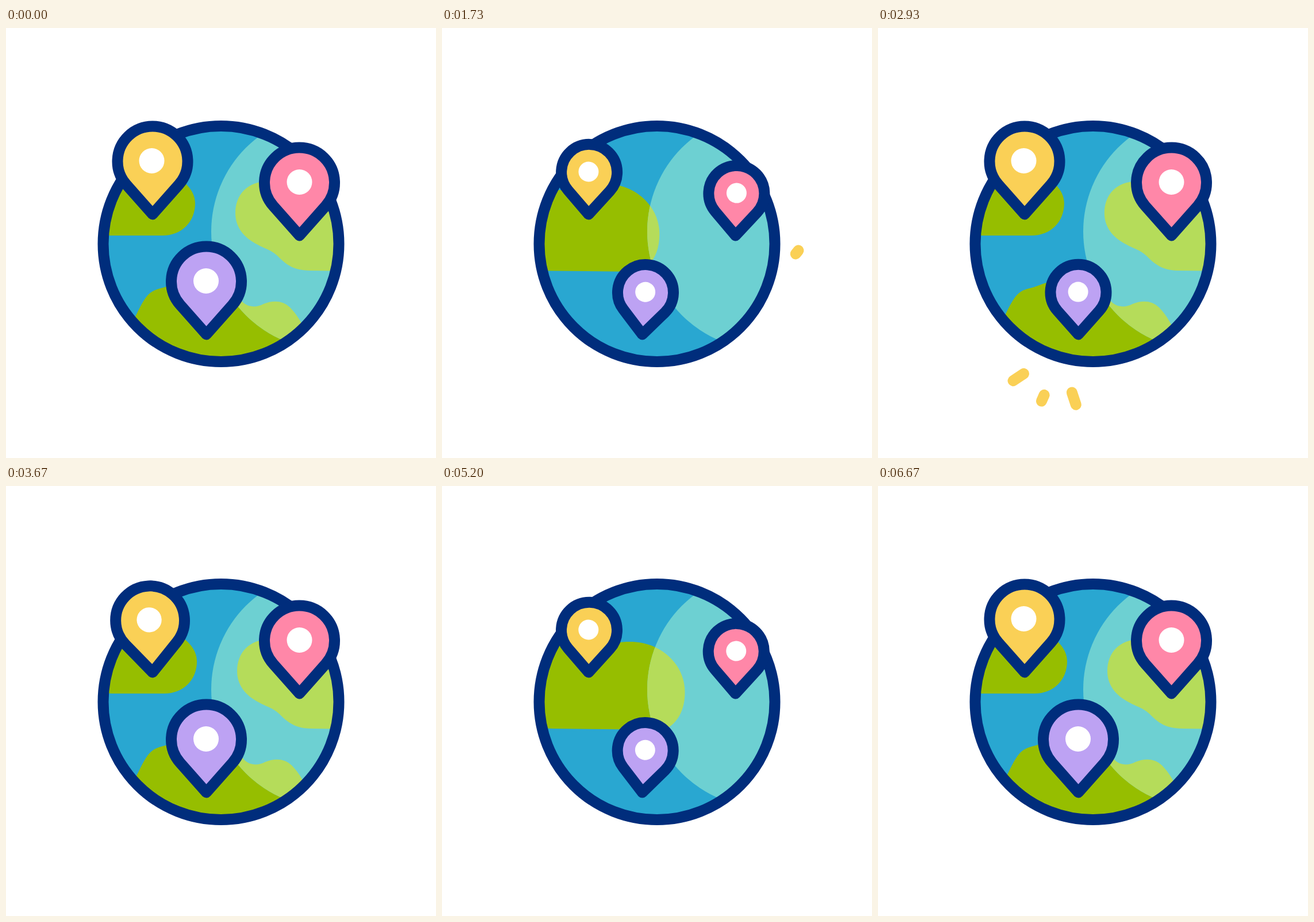
An HTML page for the animation above (6740 ms loop, 748 by 748 pixels).

```html
<!DOCTYPE html>
<html lang="en">
<head>
<meta charset="utf-8">
<title>Globe with pins</title>
<style>
  html, body { margin: 0; width: 100%; height: 100%; overflow: hidden; background: #fff; }
  svg { display: block; width: 100%; height: 100%; }
  .line { fill: none; stroke: #fad056; stroke-width: 19; stroke-linecap: round; }
  .pin path { stroke: #002d7c; stroke-linejoin: round; }
</style>
</head>
<body>
<svg viewBox="0 0 748 748">
  <defs>
    <clipPath id="globe"><circle cx="374" cy="375.5" r="200"/></clipPath>
    <clipPath id="shine"><circle cx="563" cy="354" r="206"/></clipPath>
    <g id="lands">
      <path d="M182 361H272C306 361 329 337 329 305C329 280 306 259 262 240C235 225 215 220 187 220C125 220 77 245 77 283C77 325 125 361 182 361Z"/>
      <path d="M399 322C399 290 420 267 455 267C500 268 540 282 590 282C615 282 625 271 665 271C718 271 760 310 760 358C760 390 748 412 725 424L530 422C505 422 492 415 478 402C462 385 452 385 438 377C412 364 399 345 399 322Z"/>
      <path d="M210 600C207 560 212 525 228 496C242 468 248 458 268 453C290 448 300 438 332 438C375 438 400 460 410 475C420 486 435 487 448 480C465 473 482 474 494 486C515 508 532 540 530 600Z"/>
    </g>
    <g id="map"><use href="#lands"/><use href="#lands" x="-854"/></g>
  </defs>

  <g id="sparks"></g>
  <g clip-path="url(#globe)">
    <rect width="748" height="748" fill="#29a7d1"/>
    <use class="map" href="#map" fill="#96be00"/>
    <g clip-path="url(#shine)">
      <rect width="748" height="748" fill="#6dd0d2"/>
      <use class="map" href="#map" fill="#b5dc5a"/>
    </g>
  </g>
  <circle cx="374" cy="375.5" r="205" fill="none" stroke="#002d7c" stroke-width="19"/>
  <g id="pins"></g>
  <path id="trail" class="line" pathLength="1" d="M130 387C178 450 280 479 375 479S572 450 620 387"/>
</svg>
<script>
const LOOP = 6740, CYCLE = LOOP / 2, STEP = LOOP / 101;
const MAP_WIDTH = 854, STROKE = 19;

// x, y: tip; dot: hole offset; start: shrink; burst: sparks; grow: return to full size
const pins = [
  { x: 255, y: 324, color: '#fad056', dot: -1.5, start: 200, burst: 2130, grow: 2400, place: '' },
  { x: 510.5, y: 361, color: '#ff87a8', dot: 0, start: 320, burst: 2420, grow: 2700, place: 'rotate(93 374 375.5)' },
  { x: 348.5, y: 533, color: '#bda2f3', dot: -.5, start: 800, burst: 2700, grow: 2980, place: 'rotate(242 374 375.5) translate(7 7)' }
];
const sway = [[0, 0], [100, -2.8], [220, -4], [330, -3], [600, 4.5], [720, 5], [930, 4.3], [1600, .8], [2000, 0]];
const shrink = [[0, 1], [100, .982], [330, .845], [420, .795]];

const progress = (t, from, to) => Math.min(1, Math.max(0, (t - from) / (to - from)));
const smooth = u => u * u * (3 - 2 * u);
const easeOut = (u, power = 2) => 1 - (1 - u) ** power;

function follow(keys, t) {
  const i = keys.findIndex(key => key[0] > t);
  if (i === 0) return keys[0][1];
  if (i < 0) return keys[keys.length - 1][1];
  const [t0, a] = keys[i - 1], [t1, b] = keys[i];
  return a + (b - a) * smooth(progress(t, t0, t1));
}

function trim(line, tail, head) {
  line.style.visibility = head > tail ? 'visible' : 'hidden';
  line.setAttribute('stroke-dasharray', `${Math.max(0, head - tail)} 3`);
  line.setAttribute('stroke-dashoffset', -tail);
}

function add(parent, markup) {
  parent.insertAdjacentHTML('beforeend', markup);
  return parent.lastElementChild;
}

const $ = id => document.getElementById(id);
for (const pin of pins) {
  pin.body = add($('pins'), `<g class="pin" fill="${pin.color}">
    <path d="M0 0L-45.7-51.6A61 61 0 1 1 45.7-51.6Z"/>
    <circle cx="${pin.dot}" cy="-93" r="22" fill="#fff"/></g>`);
  pin.outline = pin.body.querySelector('path');
  const burst = add($('sparks'), `<g transform="${pin.place}">` +
    ['M226 175L222 134', 'M181 178L167.5 161', 'M175 218L134 211']
      .map(d => `<path class="line" pathLength="1" d="${d}"/>`).join('') + '</g>');
  pin.rays = burst.querySelectorAll('path');
}
const maps = document.querySelectorAll('.map');

function draw(t) {
  const shift = MAP_WIDTH * smooth(progress(t, 200, 3067));
  maps.forEach(map => map.setAttribute('transform', `translate(${shift})`));

  for (const pin of pins) {
    const local = t - pin.start;
    const small = follow(shrink, local);
    const scale = small + (1 - small) * easeOut(progress(t, pin.grow, pin.grow + 250));
    pin.body.setAttribute('transform',
      `translate(${pin.x} ${pin.y}) rotate(${follow(sway, local)}) scale(${scale})`);
    pin.outline.setAttribute('stroke-width', STROKE / scale);

    const head = easeOut(progress(t, pin.burst, pin.burst + 240));
    const tail = smooth(progress(t, pin.burst + 70, pin.burst + 420));
    pin.rays.forEach(ray => trim(ray, tail, head));
  }

  trim($('trail'), smooth(progress(t, 1140, 1780)), easeOut(progress(t, 970, 1530), 2.3));
}

// The picture advances in even steps, about fifteen a second.
function tick() {
  const step = Math.floor((performance.now() % LOOP + 6) / STEP) % 101;
  draw(step * STEP % CYCLE);
  requestAnimationFrame(tick);
}
tick();
</script>
</body>
</html>
```
